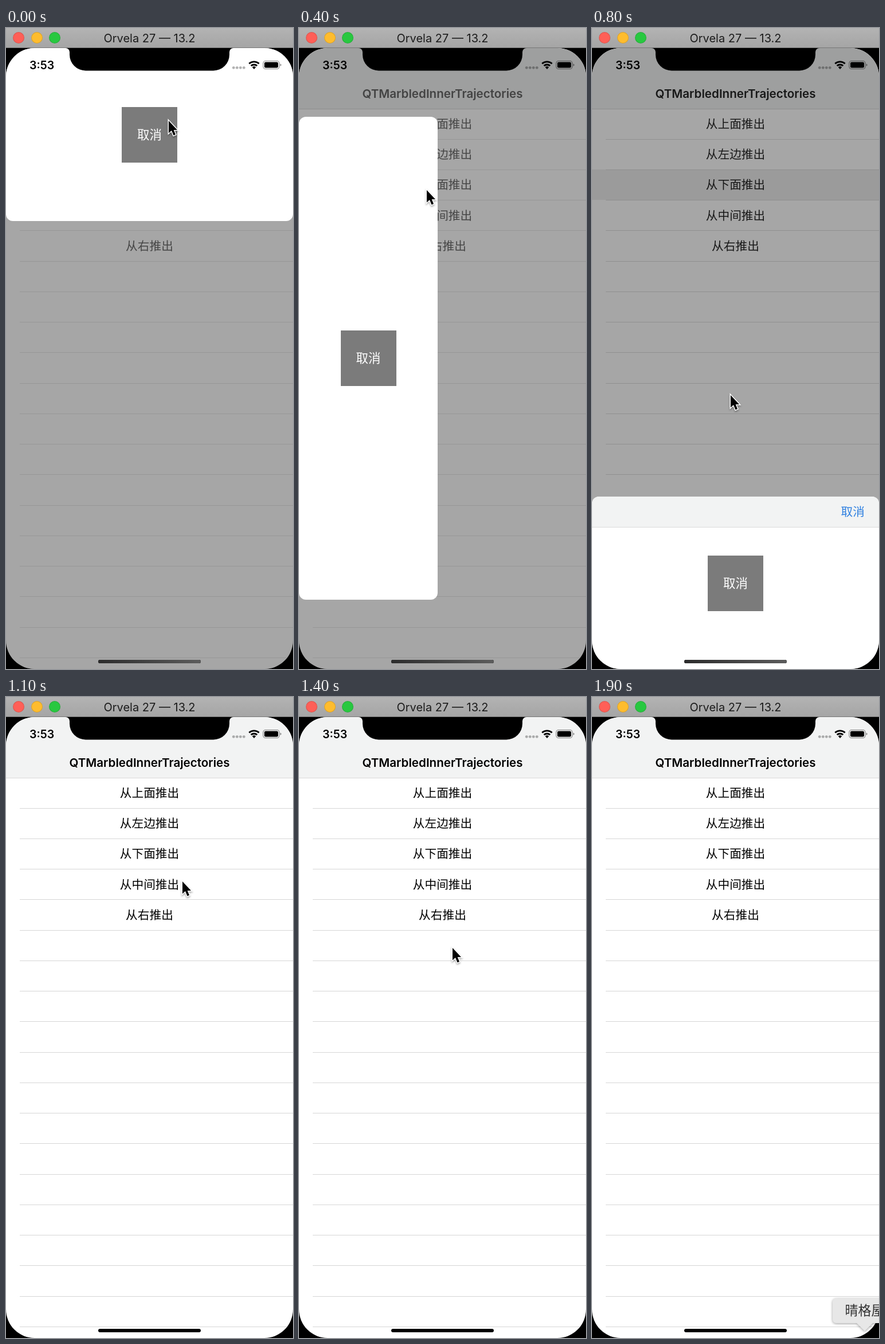
Animation, 501 px wide and 1119 px high, one loop 2000 ms. Source, as an HTML page:

```html
<!DOCTYPE html>
<html lang="zh-CN">
<head>
<meta charset="utf-8">
<style>
  html, body { margin: 0; width: 100%; height: 100%; overflow: hidden; background: #000; }
  #stage { position: relative; width: 501px; height: 1119px; overflow: hidden; background: #000;
    font-family: Inter, "Noto Sans CJK SC", "Noto Sans CJK", sans-serif; color: #000; }
  #stage div, svg { position: absolute; box-sizing: border-box; }
  .mid { text-align: center; white-space: nowrap; }
  #bar { left: 0; top: 0; width: 501px; height: 35px; font-size: 20px; line-height: 36px; color: #1c1c1c;
    background: linear-gradient(#b3b3b3, #a5a5a5); border-bottom: 1px solid #777; }
  .light { top: 7px; width: 20px; height: 20px; border-radius: 50%; border: 1px solid #0002; }
  #screen { inset: 0; background: #fff; clip-path: inset(35px 0 0 0 round 50px); }
  #nav { left: 0; top: 35px; width: 501px; height: 107px; background: #f2f3f3; border-bottom: 1px solid #dadada; }
  #list { inset: 0; }
  #title { left: 0; width: 501px; top: 100px; line-height: 30px; font-size: 20.6px; font-weight: 600; }
  .row { left: 0; width: 501px; height: 53px; line-height: 53px; font-size: 20.7px; }
  .line { left: 24px; width: 477px; height: 1px; background: #d6d6d6; }
  #sel { left: 0; width: 501px; height: 53px; background: #eee; }
  #dim { inset: 0; background: #000; }
  .panel { background: #fff; border-radius: 12px; overflow: hidden; }
  .button { left: calc(50% - 48.5px); top: calc(50% - 48.5px); width: 97px; height: 97px;
    background: #7b7b7b; color: #fff; font-size: 21.5px; line-height: 97px; }
  #tools { left: 0; top: 0; width: 501px; height: 54px; background: #f2f3f3; border-bottom: 1px solid #dadada;
    color: #3080e0; font-size: 20.7px; line-height: 53px; text-align: right; padding-right: 25px; }
  #clock { left: 41px; top: 50px; line-height: 30px; font-size: 19.6px; font-weight: 600; }
  .home { left: 161px; top: 1103.3px; width: 179px; height: 6px; border-radius: 3px; background: #000; }
  #homeDim { background: linear-gradient(90deg, #2c2c2c, #5c5c5c); }
  #tip { left: 420px; top: 1050px; width: 112px; height: 58px; filter: drop-shadow(0 1px 2px #0006); }
  #tip .box { inset: 0 0 15px; border-radius: 6px; background: #e7e7e7; color: #333;
    font-size: 23px; line-height: 42px; }
  #tip .beak { left: 41px; top: 42px; border: 15px solid transparent; border-top-color: #e7e7e7; border-bottom: 0; }
  #cursor { left: 0; top: 0; overflow: visible; filter: drop-shadow(0 2px 1.5px #0005); }
</style>
</head>
<body>
<div id="stage">
  <div id="bar" class="mid">Orvela 27 — 13.2
    <div class="light" style="left:12px;background:#ff5f57"></div>
    <div class="light" style="left:43.5px;background:#febc2e"></div>
    <div class="light" style="left:75px;background:#28c840"></div>
  </div>
  <div id="screen">
    <div id="nav"></div>
    <div id="sel"></div>
    <div id="list"><div id="title" class="mid">QTMarbledInnerTrajectories</div></div>
    <div id="dim"></div>
    <div class="panel" style="left:0;top:35px;width:501px;height:302px;border-radius:0 0 12px 12px"><div class="button mid">取消</div></div>
    <div class="panel" style="left:0;top:155px;width:242px;height:843px"><div class="button mid">取消</div></div>
    <div class="panel" style="left:0;top:818px;width:501px;height:303px;border-radius:12px 12px 0 0">
      <div id="tools">取消</div><div class="button mid">取消</div></div>
    <div class="panel" style="left:99px;top:425px;width:303px;height:303px"><div class="button mid">取消</div></div>
    <div class="panel" style="left:259px;top:155px;width:242px;height:843px"><div class="button mid">取消</div></div>
    <div id="clock">3:53</div>
    <svg width="501" height="120">
      <path d="M104 35a7 7 0 0 1 7 7v4.500a28 28 0 0 0 28 28h223a28 28 0 0 0 28-28v-4.500a7 7 0 0 1 7-7z"/>
      <g fill="#0000004d">
        <circle cx="397.3" cy="69.3" r="2.4"/><circle cx="403.3" cy="69.3" r="2.4"/>
        <circle cx="409.3" cy="69.3" r="2.4"/><circle cx="415.3" cy="69.3" r="2.4"/>
      </g>
      <g transform="translate(433 72)">
        <path d="M-8.700-9.700a13 13 0 0 1 17.400 0M-5.350-5.950a8 8 0 0 1 10.700 0" fill="none" stroke="#000" stroke-width="2.800"/>
        <path d="M0 0L-3.200-3.600a4.800 4.800 0 0 1 6.400 0z"/>
      </g>
      <rect x="449" y="57.500" width="28" height="14" rx="4" fill="none" stroke="#0007" stroke-width="1.200"/>
      <rect x="451" y="59.500" width="24" height="10" rx="2.300"/>
      <path d="M478.600 62.200q2 .8 2 2.300t-2 2.300z" fill="#0007"/>
    </svg>
    <div class="home"></div>
    <div id="homeDim" class="home"></div>
  </div>
  <div id="tip"><div class="box mid">晴格屋</div><div class="beak"></div></div>
  <svg id="cursor" width="20" height="32">
    <path d="M0 0V21.500L5 17L8.500 25.500L12 24L8.700 16H15Z" stroke="#fff" stroke-width="3" paint-order="stroke"/>
  </svg>
</div>
<script>
  const LOOP = 2000, STEP = 100, ROW = 53.24, TOP = 141;
  const $ = id => document.getElementById(id);

  function add(cls, top, text = '') {
    const el = document.createElement('div');
    el.className = cls;
    el.style.top = top + 'px';
    el.textContent = text;
    $('list').append(el);
  }
  ['从上面推出', '从左边推出', '从下面推出', '从中间推出', '从右推出']
    .forEach((text, i) => add('row mid', TOP + ROW * i, text));
  for (let i = 1; i < 19; i++) add('line', Math.floor(TOP + ROW * i));

  // Each panel is fully in between `from` and `to`; `in` and `out` are slide times.
  const panels = [
    { from: -50, to: 0, out: 200, dx: 0, dy: -302 },
    { from: 400, to: 500, in: 200, dx: -242, dy: 0 },
    { from: 800, to: 900, in: 200, dx: 0, dy: 303 },
    { from: 1200, to: 1200, out: 200, dx: 0, dy: 0 },
    { from: 1600, to: 1700, in: 200, dx: 242, dy: 0 }
  ];
  document.querySelectorAll('.panel').forEach((el, i) => panels[i].el = el);

  const path = [
    [0, 284, 162], [100, 280, 172], [200, 255, 215], [300, 250, 222], [400, 223, 283],
    [500, 125, 575], [600, 190, 420], [700, 250, 276], [800, 242, 641], [900, 250, 965],
    [1000, 285, 610], [1100, 308, 322], [1200, 275, 560], [1300, 268, 570], [1400, 268, 438],
    [1500, 290, 380], [1600, 299, 373], [1700, 378, 572], [1800, 430, 830], [1900, 520, 1140], [2000, 520, 1140]
  ];

  const clamp = v => Math.max(0, Math.min(1, v));
  const ease = v => v * v * (3 - 2 * v);

  function shown(p, t) {
    if (t < p.from) return ease(clamp(1 - (p.from - t) / (p.in || STEP)));
    return ease(clamp(1 - (t - p.to) / (p.out || STEP)));
  }

  function draw(t) {
    let dim = 0;
    for (const p of panels) {
      const k = shown(p, t), centre = !p.dx && !p.dy;
      p.el.style.visibility = k > 0 ? 'visible' : 'hidden';
      p.el.style.transform = centre ? `scale(${k})` : `translate(${p.dx * (1 - k)}px, ${p.dy * (1 - k)}px)`;
      dim = Math.max(dim, k);
    }
    const bottom = t >= 700 && t < 1000;
    $('dim').style.opacity = dim * 0.35;
    $('list').style.opacity = 1 - dim * (bottom ? 0.15 : 0.42);
    $('homeDim').style.opacity = dim;

    const row = t >= 700 && t < 900 ? 2 : t >= 1500 && t < 1700 ? 4 : -1;
    $('sel').style.visibility = row < 0 ? 'hidden' : 'visible';
    $('sel').style.top = TOP + ROW * row + 'px';

    const i = path.findIndex(p => p[0] > t), a = path[i - 1], b = path[i];
    const k = (t - a[0]) / (b[0] - a[0]);
    const at = n => a[n] + (b[n] - a[n]) * k;
    $('cursor').style.transform = `translate(${at(1)}px, ${at(2)}px)`;
    $('tip').style.visibility = t >= 1900 ? 'visible' : 'hidden';
  }

  const start = performance.now();
  function tick() {
    const t = (performance.now() - start) % LOOP;
    draw(Math.floor(t / STEP) * STEP);
    requestAnimationFrame(tick);
  }
  tick();
</script>
</body>
</html>
```
